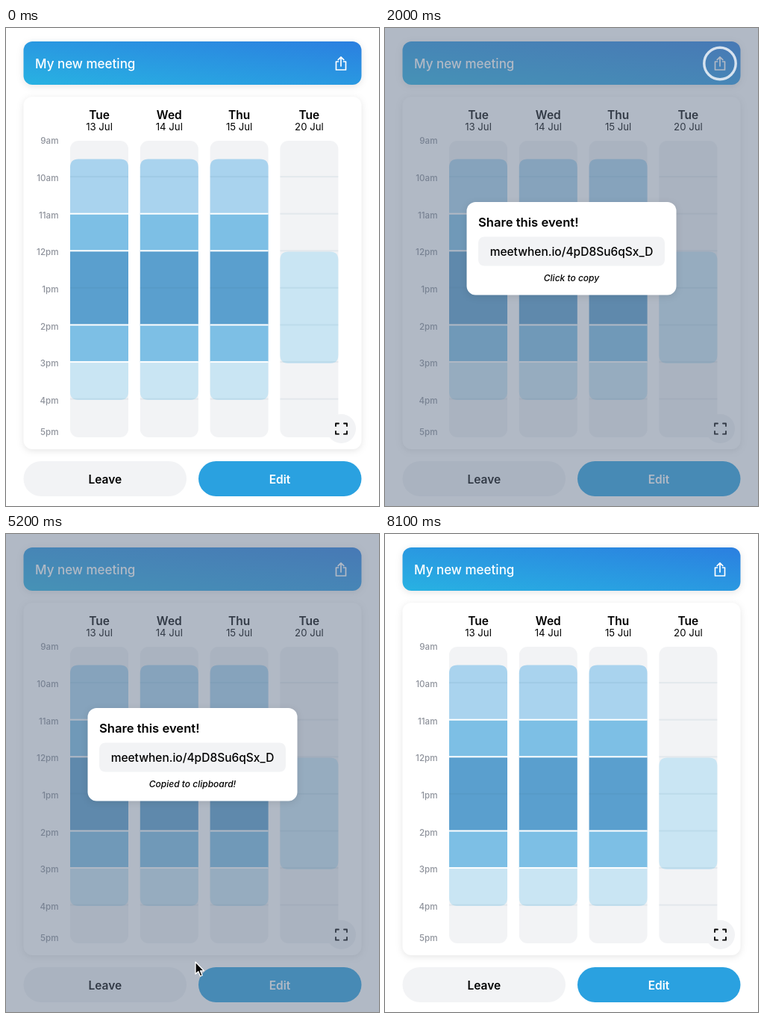
Animation of 500x640 px, one loop 8900 ms. Source, as an HTML page:

```html
<!DOCTYPE html>
<html lang="en">
<head>
<meta charset="utf-8">
<title>Meeting planner</title>
<style>
html, body { margin: 0; width: 100%; height: 100%; overflow: hidden; background: #fff; }
svg { display: block; width: 500px; height: 640px; }
text { font-family: Inter, "Open Sans", sans-serif; font-weight: 500; }
.card { filter: drop-shadow(0 2px 5px rgba(0, 0, 0, .1)); }
.b { font-weight: 600; }
.i { font-style: italic; }
.line { fill: none; stroke-linecap: round; stroke-linejoin: round; }
</style>
</head>
<body>
<svg viewBox="0 0 500 640">
  <defs>
    <linearGradient id="blue" x1="0" y1="1" x2="1" y2="0">
      <stop offset="0" stop-color="#28b2e2"/>
      <stop offset="1" stop-color="#2b7fe0"/>
    </linearGradient>
  </defs>

  <rect class="card" x="23.5" y="18" width="453" height="58" rx="12" fill="url(#blue)"/>
  <text x="39" y="53.5" font-size="17" fill="#fff">My new meeting</text>
  <path class="line" stroke="#fff" stroke-width="1.7"
    d="M445.5 45H442.5V56H455.5V45H452.5M449 51V39M445.2 42.6L449 38.8L452.8 42.6"/>

  <rect class="card" x="23.5" y="92" width="453" height="472" rx="12" fill="#fff"/>
  <g id="grid"></g>
  <circle cx="449.5" cy="536.5" r="19.5" fill="#f2f3f5"/>
  <path class="line" stroke="#000" stroke-width="1.8"
    d="M442 533V529.5H446M453 529.5H457V533M457 540V543.7H453M446 543.7H442V540"/>

  <rect x="23.5" y="580" width="218.5" height="47" rx="23.5" fill="#f2f3f5"/>
  <rect x="258" y="580" width="218.5" height="47" rx="23.5" fill="#2aa1e0"/>
  <g class="b" font-size="15.5" text-anchor="middle">
    <text class="b" x="132.8" y="609.5">Leave</text>
    <text class="b" x="367" y="609.5" fill="#fff">Edit</text>
  </g>

  <rect id="dim" width="500" height="640" fill="#64748b"/>
  <circle id="ring" cx="449" cy="47.5" r="21.2" fill="none" stroke="#fff" stroke-opacity=".78" stroke-width="3.4"/>

  <g id="modal">
    <rect class="card" x="109.5" y="233" width="281" height="124.5" rx="12" fill="#fff"/>
    <text class="b" x="125" y="266" font-size="16.6">Share this event!</text>
    <rect id="box" x="125" y="279.5" width="250" height="39" rx="8"/>
    <text id="link" x="250" y="305" font-size="15.5" text-anchor="middle">meetwhen.io/4pD8Su6qSx_D</text>
    <text id="hint" class="i" x="250" y="338.8" font-size="12" text-anchor="middle"></text>
  </g>

  <g id="cursor" stroke-linejoin="round">
    <path id="arrow" fill="#000" stroke="#fff" stroke-width="1.3"
      d="M0 0V16.2L3.8 12.8L6.5 19L9.1 17.9L6.5 11.8H11.4Z"/>
    <g id="hand" fill="#fff" stroke="#000" stroke-width="1.2" stroke-linecap="round">
      <path d="M-1.6 1.2c0-2.2 3.2-2.2 3.2 0V7c.2-1.5 2.9-1.4 3 .3c.3-1.2 2.7-1 2.8.6c.6-.8 2.4-.4 2.4 1.2V12.5c0 3-1.6 3.6-1.8 6.5H-1.5c-.6-3-3-4.6-4.8-7.2c-1.6-2.2.9-3.6 2.6-1.6l2.1 2.2Z"/>
      <path d="M1.2 12.5v3.5M3.9 12.5v3.5M6.5 12.5v3.5" stroke-width="1"/>
    </g>
  </g>
</svg>
<script>
const LOOP = 8900;
const $ = id => document.getElementById(id);
const hourY = h => 149.5 + 49.6 * (h - 9);

// Calendar
let out = "";
const rect = (x, y, w, h, fill, more = "") =>
  out += `<rect x="${x}" y="${y}" width="${w}" height="${h}" fill="${fill}" ${more}/>`;
const text = (x, y, size, s, more) =>
  out += `<text x="${x}" y="${y}" font-size="${size}" ${more}>${s}</text>`;

// Block from y0 to y1 with rounded top and/or bottom corners
const block = (x, y0, y1, fill, top, bottom) => {
  const a = top ? 11 : 0, b = bottom ? 11 : 0;
  out += `<path fill="${fill}" d="M${x} ${y0 + a}q0 ${-a} ${a} ${-a}H${x + 78 - a}q${a} 0 ${a} ${a}` +
    `V${y1 - b}q0 ${b} ${-b} ${b}H${x + b}q${-b} 0 ${-b} ${-b}Z"/>`;
};

for (let h = 9; h <= 17; h++) {
  const y = h < 17 ? 155.2 + 49.7 * (h - 9) : 545.2;
  text(70.5, y, 11.6, (h > 12 ? h - 12 : h) + (h < 12 ? "am" : "pm"), 'text-anchor="end" fill="#8f939c"');
}

const busy = [
  [175.5, hourY(11), "#a9d3ee"], [hourY(11), hourY(12), "#7dbfe5"], [hourY(12), hourY(14), "#5a9fce"],
  [hourY(14), hourY(15), "#7dbfe5"], [hourY(15), 498, "#c9e5f3"]
];
const light = [[299.5, 449, "#c9e5f3"]];

["Tue 13", "Wed 14", "Thu 15", "Tue 20"].forEach((day, i) => {
  const x = 86 + 93.8 * i, [name, date] = day.split(" "), blocks = i < 3 ? busy : light;
  text(x + 39, 122, 15.5, name, 'class="b" text-anchor="middle"');
  text(x + 39, 137.3, 13.2, date + " Jul", 'text-anchor="middle" style="font-weight:400"');
  rect(x, 151, 78, 397, "#f2f3f5", 'rx="11"');
  blocks.forEach(([y0, y1, fill], n) => block(x, y0, y1, fill, !n, n == blocks.length - 1));
  for (let h = 10; h < 17; h++) {
    const gap = i < 3 && [11, 12, 14, 15].includes(h);
    rect(x, hourY(h) - 1, 78, 2, gap ? "#fff" : "#3c6482", gap ? "" : 'fill-opacity=".08"');
  }
});
$("grid").innerHTML = out;

// Motion
const clamp = v => Math.min(1, Math.max(0, v));
const ease = v => v * v * (3 - 2 * v);
const ramp = (t, from, to) => clamp((t - from) / (to - from));

// Cursor stops: time, x, y
const path = [
  [1030, 504, 330], [1500, 453, 51], [2300, 453, 51], [3150, 290, 405], [3200, 290, 405],
  [3550, 264, 352], [3700, 264, 352], [3800, 261, 348], [4400, 261, 348],
  [5200, 254, 573], [6400, 254, 573], [6650, 240, 646]
];
const cursorAt = t => {
  const n = path.findIndex(p => p[0] > t);
  if (n < 1) return path[n < 0 ? path.length - 1 : 0].slice(1);
  const [t0, x0, y0] = path[n - 1], [t1, x1, y1] = path[n], k = ease(ramp(t, t0, t1));
  return [x0 + (x1 - x0) * k, y0 + (y1 - y0) * k];
};
const show = (id, on) => $(id).setAttribute("visibility", on ? "visible" : "hidden");

function draw(t) {
  const shown = ramp(t, 1740, 1990) * (1 - ramp(t, 5600, 5790));
  $("dim").setAttribute("opacity", .5 * ease(shown));
  $("modal").setAttribute("opacity", shown);
  show("ring", t >= 1740 && t < 3990);

  const [x, y] = cursorAt(t);
  const hover = t > 3200 && t < 5000 && y < 357;
  $("box").setAttribute("fill", hover ? "url(#blue)" : "#f2f3f5");
  $("link").setAttribute("fill", hover ? "#fff" : "#000");
  $("hint").textContent = t < 3990 ? "Click to copy" : "Copied to clipboard!";

  const visible = t >= 1030 && t < 6650 && !(t >= 1950 && t < 2300);
  $("cursor").setAttribute("transform", `translate(${x} ${y})`);
  show("arrow", visible && !hover);
  show("hand", visible && hover);
}

const start = performance.now();
function tick() {
  draw((performance.now() - start) % LOOP);
  requestAnimationFrame(tick);
}
tick();
</script>
</body>
</html>
```
